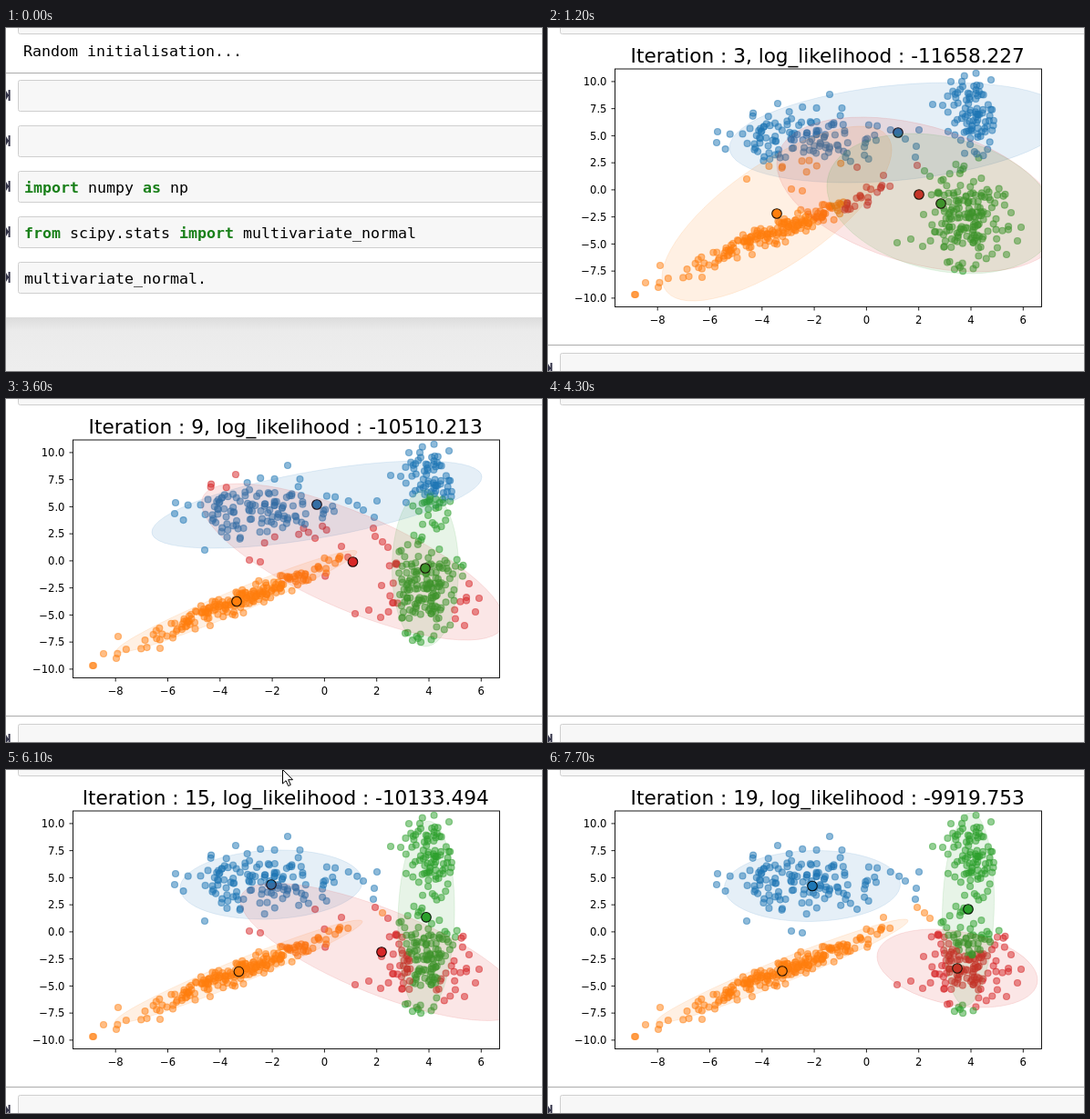
An HTML page for the animation above (8000 ms loop, 588 by 377 pixels).

```html
<!DOCTYPE html>
<html lang="en">
<head>
<meta charset="utf-8">
<title>Gaussian mixture fit</title>
<style>
  html, body { margin: 0; width: 100%; height: 100%; overflow: hidden; background: #fff; }
  svg { display: block; width: 588px; height: 377px; }
  .mono { font: 16.61px "DejaVu Sans Mono", monospace; }
  .kw { font-weight: bold; fill: #1a801a; }
  .cell { fill: #f7f7f7; stroke: #cfcfcf; }
  .rule { stroke: #ababab; }
  #plot text { font: 11.6px "DejaVu Sans", sans-serif; text-anchor: middle; }
  #plot #yTicks text { text-anchor: end; }
  #plot #title { font-size: 21.6px; }
  #points circle { fill-opacity: .5; stroke-opacity: .5; stroke-width: 1.2; }
  #means circle { stroke: #000; stroke-width: 1.1; }
  #hulls circle { fill-opacity: .115; stroke-opacity: .115; vector-effect: non-scaling-stroke; }
  .axis { fill: none; stroke: #000; stroke-width: .9; }
</style>
</head>
<body>
<svg viewBox="0 0 588 377">
  <defs>
    <linearGradient id="shade" x2="0" y2="1">
      <stop stop-color="#dcdcdc"/><stop offset=".25" stop-color="#ebebeb"/><stop offset="1" stop-color="#eee"/>
    </linearGradient>
    <clipPath id="box"><rect x="73.5" y="45" width="468" height="261.5"/></clipPath>
  </defs>
  <rect class="cell" x="13.5" y="-20" width="600" height="26.5" rx="2"/>

  <g id="intro">
    <text class="mono" x="19" y="31">Random initialisation...</text>
    <path class="rule" d="M0 49.5H588"/>
    <g id="cells"></g>
    <text class="mono" x="20" y="181"><tspan class="kw">import</tspan> numpy <tspan class="kw">as</tspan> np</text>
    <text class="mono" x="20" y="231"><tspan class="kw">from</tspan> scipy.stats <tspan class="kw">import</tspan> multivariate_normal</text>
    <text class="mono" x="20" y="281">multivariate_normal.</text>
    <rect y="318" width="588" height="59" fill="url(#shade)"/>
  </g>

  <g id="page">
    <path class="rule" d="M0 348.5H588"/>
    <g id="nextCell"></g>
    <g id="plot">
      <g clip-path="url(#box)">
        <g id="points"></g>
        <g id="means"></g>
        <g id="hulls"></g>
      </g>
      <rect class="axis" x="73.5" y="45" width="468" height="261.5"/>
      <g id="xTicks"></g>
      <g id="yTicks"></g>
      <text id="title" x="306.7" y="38"></text>
    </g>
  </g>
  <path id="cursor" d="M0 0V15.5L3.6 12.2L6.2 18L8.8 16.8L6.2 11.2H11Z" fill="#fff" stroke="#000"/>
</svg>
<script>
const $ = id => document.getElementById(id);
const LOOP = 8000;
const COLORS = ['#1f77b4', '#ff7f0e', '#d62728', '#2ca02c'];

// Start time of each iteration, and the moments when the output is cleared
const STARTS = [100, 500, 800, 1200, 1600, 2000, 2400, 3000, 3200, 3600,
  3900, 4400, 4800, 5300, 5700, 6100, 6500, 6900, 7200, 7700];
const CLEARED = [4300, 6800];

// Log likelihood at some iterations, linear in between
const SCORES = [[0, -13248.614], [1, -12316.482], [3, -11658.227], [6, -10805.175],
  [9, -10510.213], [12, -10334.198], [15, -10133.494], [17, -9984.731], [19, -9919.753]];

// One track per component: iteration, centre x, y, half width, half height, correlation
const TRACKS = [
  [[3, 384, 115, 185, 55, -.3], [6, 357.5, 114, 191, 46, -.62], [9, 341, 116, 181, 48, -.63],
    [12, 312, 122, 147, 43, -.42], [15, 291, 126, 100, 38, -.1], [19, 290, 127.5, 96.5, 39, -.05]],
  [[3, 251, 204, 126, 96, -.73], [6, 249, 220, 121, 64, -.9], [9, 253, 222.5, 132, 56, -.97],
    [19, 257, 221, 138, 57, -.97]],
  [[3, 407, 183, 156, 85, .4], [6, 402.5, 179.5, 147, 79, .5], [9, 380.5, 179, 166, 86, .75],
    [12, 385, 186, 174, 88, .81], [15, 412, 200, 155, 75.5, .75], [19, 449, 218, 88, 43, .3]],
  [[3, 431, 193, 125, 77, .25], [6, 457, 197.5, 49.5, 70, 0], [9, 460, 186, 36.5, 86, 0],
    [12, 461, 168.5, 33, 105.5, -.08], [19, 461, 153, 28.5, 106, -.1]]
];
const WIDE = [180, 110, 0];

// Sample clouds: count, centre x, y, standard deviations, correlation
const CLOUDS = [
  [130, 285, 124, 45, 20, -.05],
  [200, 256, 222, 64, 27, -.968],
  [88, 464, 95, 13, 23, 0],
  [170, 460, 208, 21, 27, 0]
];
const STRAYS = [
  95, 293, 96, 293, 107, 280, 121, 285, 123, 261, 169, 274,
  186, 114, 185, 126, 252, 83, 309, 73, 218, 166, 267, 177, 279, 179,
  392, 122, 403, 142, 404, 130, 407, 112,
  422, 84, 433, 85, 442, 59, 486, 57,
  405, 151, 413, 157, 419, 163, 368, 162,
  383, 236, 398, 232, 411, 240, 412, 205, 508, 203, 519, 219, 515, 234, 503, 249
];

let seed = 11;
function random() {
  seed = seed + 0x6D2B79F5 | 0;
  let h = Math.imul(seed ^ seed >>> 15, 1 | seed);
  h = h + Math.imul(h ^ h >>> 7, 61 | h) ^ h;
  return ((h ^ h >>> 14) >>> 0) / 4294967296;
}
function normalPair() {
  const r = Math.sqrt(-2 * Math.log(1 - random())), a = 2 * Math.PI * random();
  return r > 2.25 ? normalPair() : [r * Math.cos(a), r * Math.sin(a)];
}

function add(parent, tag, attrs, text = '') {
  const el = document.createElementNS('http://www.w3.org/2000/svg', tag);
  for (const k in attrs) el.setAttribute(k, attrs[k]);
  el.textContent = text;
  return parent.appendChild(el);
}

function addCell(parent, y) {
  add(parent, 'rect', { class: 'cell', x: 13.5, y: y + .5, width: 600, height: 34, rx: 2 });
  add(parent, 'path', { fill: '#303045', d: `M0 ${y + 12}L3 ${y + 17}L0 ${y + 22}ZM2.6 ${y + 11}h2v12h-2Z` });
}
for (let y = 57; y < 300; y += 50) addCell($('cells'), y);
addCell($('nextCell'), 357);

const label = s => s.replace('-', '\u2212');
for (let v = -8; v <= 6; v += 2) {
  const x = 349.4 + 28.65 * v;
  add($('xTicks'), 'path', { class: 'axis', d: `M${x} 306.5v4` });
  add($('xTicks'), 'text', { x, y: 325 }, label(String(v)));
}
for (let v = -10; v <= 10; v += 2.5) {
  const y = 177.9 - 11.9 * v;
  add($('yTicks'), 'path', { class: 'axis', d: `M73.5 ${y}h-4` });
  add($('yTicks'), 'text', { x: 64.5, y: y + 4.3 }, label(v.toFixed(1)));
}

const points = [];
function addPoint(x, y) {
  points.push({ x, y, el: add($('points'), 'circle', { cx: x, cy: y, r: 3.5 }) });
}
for (const [n, cx, cy, sx, sy, rho] of CLOUDS)
  for (let i = 0; i < n; i++) {
    const [u, v] = normalPair();
    addPoint(cx + sx * u, cy + sy * (rho * u + Math.sqrt(1 - rho * rho) * v));
  }
for (let i = 0; i < STRAYS.length; i += 2) addPoint(STRAYS[i], STRAYS[i + 1]);

const means = COLORS.map(fill => add($('means'), 'circle', { r: 5.3, fill }));
const hulls = COLORS.map(c => add($('hulls'), 'circle', { r: 1, fill: c, stroke: c }));

const mix = (a, b, f) => a + (b - a) * f;

// Values of a track at a step, linear between its keys
function sample(track, step) {
  const i = Math.max(1, track.findIndex(k => k[0] >= step));
  const a = track[i - 1], b = track[i];
  const f = Math.max(0, (step - a[0]) / (b[0] - a[0]));
  return a.slice(1).map((v, k) => mix(v, b[k + 1], f));
}

// The components start wide and round, then shrink onto their tracks
function componentAt(track, step) {
  const [cx, cy, ...shape] = sample(track, step);
  const f = Math.max(0, 1 - step / 3) ** 4;
  return [cx, cy, ...shape.map((v, k) => mix(v, WIDE[k], f))];
}

// Log density up to a constant; each hull spans two standard deviations
function logDensity({ x, y }, [cx, cy, a, b, rho]) {
  const u = (x - cx) / a, v = (y - cy) / b, q = 1 - rho * rho;
  return -2 * (u * u - 2 * rho * u * v + v * v) / q - Math.log(a * b * Math.sqrt(q));
}

function showStep(step) {
  const parts = TRACKS.map(track => componentAt(track, step));
  parts.forEach(([cx, cy, a, b, rho], i) => {
    means[i].setAttribute('cx', cx);
    means[i].setAttribute('cy', cy);
    hulls[i].setAttribute('transform', `matrix(${a} ${b * rho} 0 ${b * Math.sqrt(1 - rho * rho)} ${cx} ${cy})`);
  });
  for (const p of points) {
    const d = parts.map(c => logDensity(p, c));
    const color = COLORS[d.indexOf(Math.max(...d))];
    p.el.setAttribute('fill', color);
    p.el.setAttribute('stroke', color);
  }
  $('title').textContent = `Iteration : ${step}, log_likelihood : ${sample(SCORES, step)[0].toFixed(3)}`;
}

const show = (id, on) => $(id).style.display = on ? '' : 'none';
let shown = -1;

function frame(now) {
  const t = now % LOOP;
  const step = STARTS.filter(s => s <= t).length - 1;
  show('intro', step < 0);
  show('page', step >= 0);
  show('plot', !CLEARED.some(c => t >= c && t < c + 100));
  if (step >= 0 && step !== shown) showStep(shown = step);

  // The pointer dips in from the top edge and leaves again
  const u = Math.floor(t / 100) - 61;
  show('cursor', u >= -2 && u < 4);
  $('cursor').setAttribute('transform', `translate(${303.5 + 2 * u} ${-.5 - 2 * u * u})`);
  requestAnimationFrame(frame);
}
requestAnimationFrame(frame);
</script>
</body>
</html>
```
